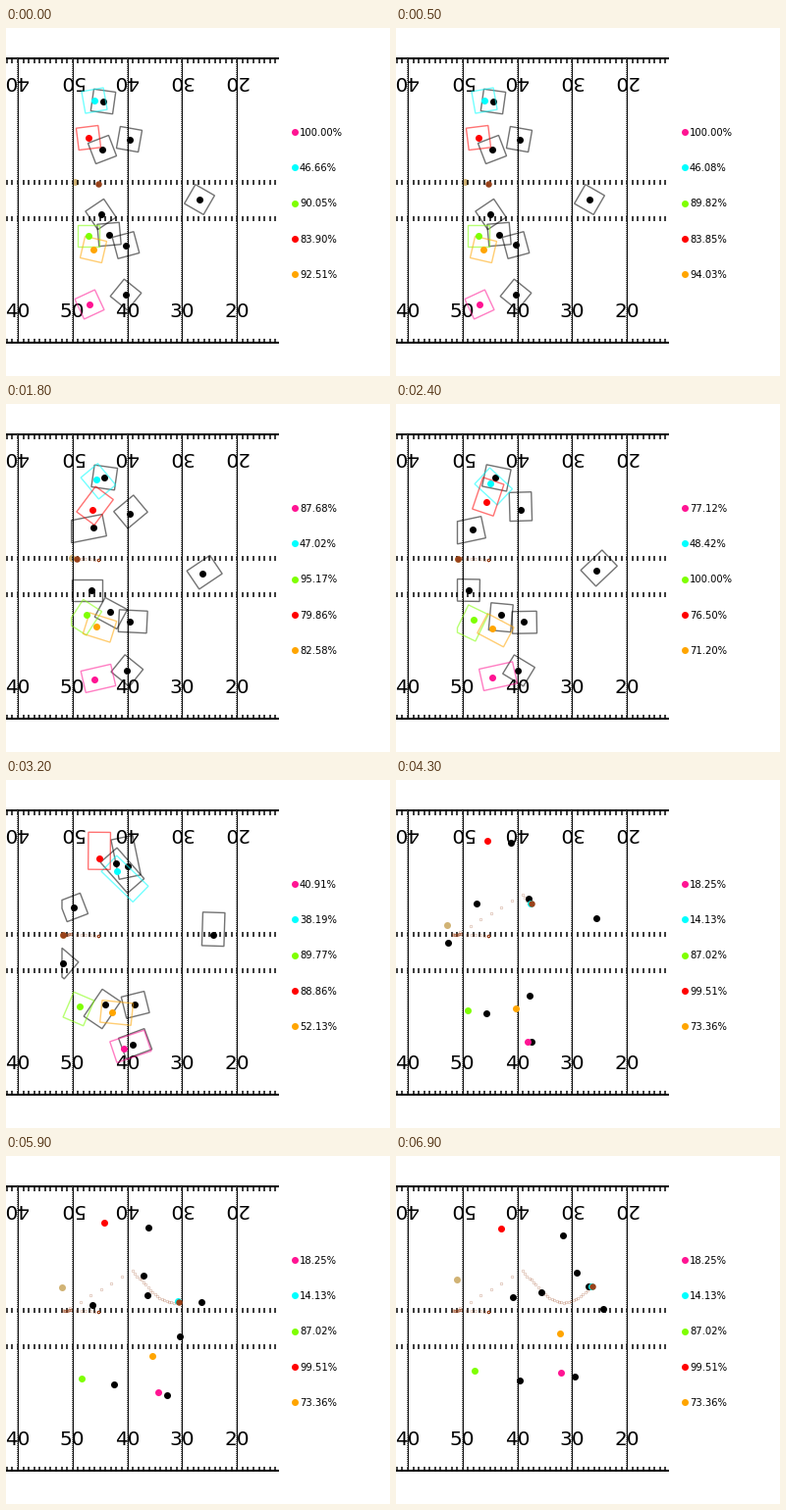
Recreate the animation shown at these times as a matplotlib script. Size 391x355 px, loop 7000 ms.

```python
import numpy as np
import matplotlib.pyplot as plt
from matplotlib.animation import FuncAnimation
from matplotlib.patches import Polygon

W, H, DPI = 391, 355, 64
PT = 72 / DPI  # points per pixel
FRAMES, STEP = 70, 100
NOW = np.arange(FRAMES) * STEP / 1000

SNAP, DROP, RELEASE, CATCH = 1.3, 1.9, 3.25, 3.9
BOX_END = 3.45  # boxes vanish once the pass is away
BOX = 22.5      # side of a standing player's box
REACH = 0.72    # seconds of movement added to its length
SPOT = np.array([94, 159])
BALL, TAN = (0.6, 0.26, 0.1), (0.82, 0.7, 0.46)

plt.rcParams["font.family"] = "DejaVu Sans"

# Everybody waits at the first point until 1.1 s.
TIMES = [0, 1.1, 2.4, 3.2, 4.3, 6.9]
PASSER = [(70, 157), (63, 157.5), (57.5, 157.5), (51.5, 147.5), (62, 126)]

# Color, angle while waiting, key points, late sag of the path.
PLAYERS = [
    ("black", 8, [(99, 75), (101, 75), (112, 85), (135, 121), (148, 139)], 9),
    ("black", 10, [(125.5, 113.5), (127, 108), (124, 88), (117, 64), (170, 81)], 0),
    ("black", -21, [(98, 124), (78, 128), (69, 130), (82, 126), (184, 119)], 0),
    ("black", 30, [(197, 175), (204, 170), (211, 158), (204, 141), (196, 133)], 14),
    ("black", 56, [(96.5, 190), (74, 190), (58, 187), (53, 166), (119, 144)], 0),
    ("black", -5, [(105, 210.5), (107, 215), (101, 229), (92, 238), (126, 229)], 0),
    ("black", -15, [(122, 221.5), (130, 222), (131, 229), (136, 220), (211, 156)], 0),
    ("black", 39, [(122, 272), (124, 272), (129, 270), (138, 267), (182, 225)], 0),
    ("deeppink", -25, [(85, 282), (98, 279), (120, 274), (134, 267), (168, 221)], 0),
    ("cyan", -10, [(90, 74), (96, 81), (113, 93), (137, 125.5), (199, 133)], 19),
    ("chartreuse", 0, [(84, 212), (79, 220), (75, 231), (73, 235), (80, 219)], 0),
    ("red", -7, [(84, 112), (92, 100), (95, 80), (93, 62), (107, 74)], 0),
    ("orange", 13, [(89, 226), (98, 229), (108, 237), (122, 233), (167, 181)], 0),
]

ODDS_TIMES = [0, 1.1, 2.4, 3.2, 3.5]
ODDS = {
    "deeppink": [100, 100, 77.12, 40.91, 18.25],
    "cyan": [46.66, 45.38, 48.42, 38.19, 14.13],
    "chartreuse": [90.05, 89.54, 100, 89.77, 87.02],
    "red": [83.90, 83.79, 76.50, 88.86, 99.51],
    "orange": [92.51, 95.86, 71.20, 52.13, 73.36],
}


def smooth(values):
    """Monotone cubic through the keys, sampled once per frame."""
    t, v = np.array(TIMES), np.array(values, float)
    gap = np.diff(t)
    rise = np.diff(v) / gap
    slope = np.r_[rise[0], np.zeros(len(v) - 2), rise[-1]]
    for i, (a, b) in enumerate(zip(rise, rise[1:]), 1):
        slope[i] = 2 * a * b / (a + b) if a * b > 0 else 0
    i = np.clip(np.searchsorted(t, NOW, "right") - 1, 0, len(gap) - 1)
    h = gap[i]
    u = (NOW - t[i]) / h
    return ((1 + 2 * u) * (1 - u) ** 2 * v[i] + u * (1 - u) ** 2 * h * slope[i]
            + u * u * (3 - 2 * u) * v[i + 1] + u * u * (u - 1) * h * slope[i + 1])


def path(points, sag=0):
    xs, ys = zip(points[0], *points)
    late = np.clip((NOW - TIMES[-2]) / (TIMES[-1] - TIMES[-2]), 0, 1)
    return np.column_stack([smooth(xs), smooth(ys) + sag * np.sin(np.pi * late)])


def ball_at(k):
    t = NOW[k]
    if t < DROP:
        u = max(0, (t - SNAP) / (DROP - SNAP))
        return SPOT + (passer[k] - SPOT) * u
    if t < RELEASE:
        return passer[k]
    if t < CATCH:
        u = (t - 3.3) / (CATCH - 3.3)
        return np.array([65 + 63 * u, 155 - 38 * u])
    return runner[k] + (0.8, 0.4)


def box_corners(center, velocity, facing):
    """Box that turns into the run and stretches ahead with speed."""
    speed = np.hypot(*velocity)
    heading = np.degrees(np.arctan2(velocity[1], velocity[0]))
    turn = (heading - facing + 90) % 180 - 90
    angle = np.radians(facing + turn * np.clip((speed - 2) / 5, 0, 1))
    c, s = np.cos(angle), np.sin(angle)
    size = np.array([BOX + REACH * speed, BOX])
    unit = np.array([(-1, -1), (1, -1), (1, 1), (-1, 1)]) / 2
    return unit * size @ np.array([(c, s), (-s, c)]) + center + velocity * REACH / 2


def clip_left(points, edge):
    """Keep the part of a polygon right of a vertical edge."""
    kept = []
    for p, q in zip(points, np.roll(points, -1, axis=0)):
        if p[0] >= edge:
            kept.append(p)
        if (p[0] >= edge) != (q[0] >= edge):
            kept.append(p + (q - p) * (edge - p[0]) / (q[0] - p[0]))
    return np.array(kept)


fig = plt.figure(figsize=(W / DPI, H / DPI), dpi=DPI, facecolor="white")
ax = fig.add_axes([0, 0, 1, 1])
ax.set(xlim=(0, W), ylim=(H, 0))
ax.axis("off")


def dot(color, z, xy=(-20, -20), size=7):
    return ax.plot(*xy, "o", color=color, ms=size * PT, mew=0, zorder=z)[0]


def draw_field():
    for y in (31, 321):
        ax.plot([-2, 278], [y, y], "k", lw=2 * PT, solid_capstyle="butt", zorder=2)
    ticks = 12 + 5.58 * np.arange(-2, 48)
    for y0, y1 in ((31, 35.5), (155, 159.5), (192, 196.5), (316.5, 321)):
        ax.vlines(ticks, y0, y1, color="black", lw=1.5 * PT, zorder=2)
    for i, label in enumerate(("40", "50", "40", "30", "20")):
        x = 12 + 55.8 * i
        ax.plot([x, x], [31, 321], color="0.4", lw=2 * PT, zorder=2,
                linestyle=(0, (0.5, 0.5)), dash_capstyle="butt")
        ax.plot([x, x], [31, 321], color="0.05", lw=PT, zorder=2)
        for dx, y, turn in ((0, 295, 0), (-1.5, 49, 180)):
            ax.text(x + dx, y, label, fontsize=20 * PT, ha="center", va="baseline",
                    rotation=turn, rotation_mode="anchor", zorder=3)


def add_player(color, facing, points, sag):
    z = 5 if color == "black" else 6
    track = path(points, sag)
    velocity = np.gradient(track, STEP / 1000, axis=0)
    outline = Polygon(np.zeros((3, 2)), closed=True, fill=False, ec=color,
                      lw=1.4 * PT, alpha=0.55, zorder=z - 1)
    ax.add_patch(outline)
    return track, velocity, facing, dot(color, z), outline


draw_field()
players = [add_player(*player) for player in PLAYERS]
passer = path(PASSER)
runner = next(path(points, sag) for color, _, points, sag in PLAYERS if color == "cyan")
ball = np.array([ball_at(k) for k in range(FRAMES)])

passer_dot = dot(TAN, 1)
ball_dot = dot(BALL, 8, size=6.5)
trail, = ax.plot([], [], "o", ms=2.6 * PT, mfc="none", mec=BALL, mew=0.6 * PT,
                 alpha=0.4, zorder=3)

labels = {}
for i, color in enumerate(ODDS):
    y = 106 + 36.25 * i
    dot(color, 5, (294, y))
    labels[color] = ax.text(299, y + 3.8, "", fontsize=10 * PT, va="baseline")


def update(k):
    t = NOW[k]
    for track, velocity, facing, mark, outline in players:
        mark.set_data(track[k:k + 1].T)
        outline.set_visible(t < BOX_END)
        if t < BOX_END:
            corners = box_corners(track[k], velocity[k], facing)
            outline.set_xy(clip_left(corners, passer[k, 0] - 0.5))
    passer_dot.set_data(passer[k:k + 1].T)
    ball_dot.set_data(ball[k:k + 1].T)
    trail.set_data(ball[:k + 1].T)
    for color, label in labels.items():
        label.set_text(f"{np.interp(t, ODDS_TIMES, ODDS[color]):.2f}%")
    return []


anim = FuncAnimation(fig, update, frames=FRAMES, interval=STEP,
                     init_func=lambda: update(0), repeat=True, repeat_delay=0)
plt.show()
```
